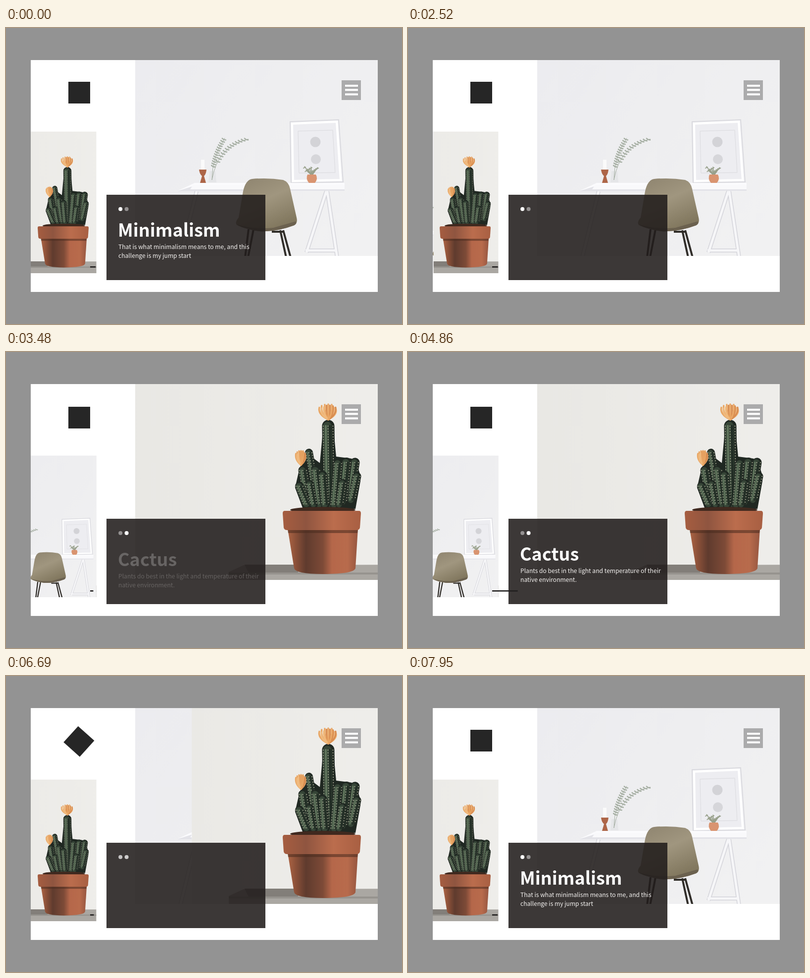
Animation of 800x600 px, one loop 8370 ms. Source, as an HTML page:

```html
<!DOCTYPE html>
<html lang="en">
<head>
<meta charset="utf-8">
<title>Minimalism slider</title>
<style>
html, body { margin: 0; width: 100%; height: 100%; overflow: hidden; background: #939393; }
svg { overflow: hidden; }
#stage { display: block; width: 800px; height: 600px; }
text { font-family: "Noto Sans CJK JP", "Noto Sans CJK SC", "Noto Sans CJK", "Noto Sans", sans-serif; fill: #fff; }
.title { font-weight: 700; font-size: 36px; }
.body { font-size: 12.1px; fill: #f6f4f2; }
</style>
</head>
<body>
<svg id="stage" viewBox="0 0 800 600">
  <defs>
    <linearGradient id="wall" x2="1" y2=".6">
      <stop stop-color="#ebebef"/><stop offset=".55" stop-color="#eeeef0"/><stop offset="1" stop-color="#f1f1f2"/>
    </linearGradient>
    <linearGradient id="shell" x2=".5" y2="1">
      <stop stop-color="#8d836e"/><stop offset=".5" stop-color="#a0967f"/><stop offset="1" stop-color="#82785f"/>
    </linearGradient>
    <linearGradient id="plaster" x2="1">
      <stop stop-color="#e8e7e3"/><stop offset="1" stop-color="#efeeeb"/>
    </linearGradient>
    <linearGradient id="clay" x2="1">
      <stop stop-color="#ad6444"/><stop offset=".12" stop-color="#8a5038"/><stop offset=".26" stop-color="#5f3b2e"/>
      <stop offset=".5" stop-color="#7d4a37"/><stop offset=".63" stop-color="#b5674a"/>
      <stop offset=".85" stop-color="#b86b4c"/><stop offset="1" stop-color="#965640"/>
    </linearGradient>
    <linearGradient id="rim" x2="1">
      <stop stop-color="#a65d40"/><stop offset=".3" stop-color="#8f5540"/><stop offset=".65" stop-color="#bb6d4d"/><stop offset="1" stop-color="#a85f42"/>
    </linearGradient>

    <g id="desk">
      <path d="M200 -40H800V520H200Z" fill="url(#wall)"/>
      <path d="M574 190L672 186L681 312L576 314Z" fill="#f4f4f6" stroke="#d9d9de" stroke-width="2"/>
      <path d="M578 194L668 190L676 308L580 310Z" fill="#ededf1" stroke="#fff" stroke-width="4"/>
      <path d="M590 209L660 207L665 293L592 294Z" fill="none" stroke="#dadade"/>
      <circle cx="625" cy="231" r="10.5" fill="#d3d3d7"/>
      <circle cx="626" cy="266" r="10" fill="#d6d6da"/>
      <path d="M345 331L381 314H684V330Z" fill="#fbfbfd"/>
      <path d="M345 331L380 320H684V330Z" fill="#e3e3e8"/>
      <path d="M378 318H684V327H372Z" fill="#f9f9fb"/>
      <g fill="none" stroke="#d4d4da" stroke-width="8">
        <path d="M385 331L352 465M647 331L607 455M649 331L669 465M605 451H666"/>
        <path d="M385 331L352 465M647 331L607 455M649 331L669 465M605 451H666" stroke="#f6f6f8" stroke-width="5"/>
      </g>
      <path d="M394 267H401V288H394Z" fill="#fafafa"/>
      <path d="M390 287H405Q404 297 400 300L404 314H392L396 300Q391 296 390 287Z" fill="#ad6547"/>
      <path d="M411 290H423L425 313H409Z" fill="#e2e4e6" opacity=".8"/>
      <g id="sprig" fill="none" stroke="#a5aea2"></g>
      <g id="herbs" fill="none" stroke="#98a08b" stroke-linecap="round"></g>
      <path d="M609 297H626Q631 306 624 314H612Q605 306 609 297Z" fill="#d99470"/>
      <path d="M490 408L483 465M500 408L489 465M554 410L566 465M560 410L575 465M537 413H562" fill="none" stroke="#302d29" stroke-width="4"/>
      <path d="M497 306Q530 303 560 308Q571 312 574 326L587 384Q590 396 582 400Q545 414 512 412Q480 407 466 399Q462 394 470 384L479 331Q484 308 497 306Z" fill="url(#shell)"/>
      <path d="M466 398Q500 409 540 405L585 392Q588 397 582 400Q545 414 512 412Q480 407 466 398Z" fill="#6b614f"/>
    </g>

    <g id="cactus">
      <path d="M200 -40H800V520H200Z" fill="url(#plaster)"/>
      <path d="M450 446L480 432L800 431V520H450Z" fill="#aaa7a2"/>
      <path d="M450 447H800V451H450Z" fill="#96938e"/>
      <path d="M482 431H590V447H490Z" fill="#827e79"/>
      <path d="M641 150Q651 130 661 150L667 212L698 216Q718 240 716 262L706 318H600L584 275L592 240L606 204L634 225Z" fill="#202822"/>
      <g id="stems" fill="none" stroke-linecap="round"></g>
      <g id="petals" fill="none" stroke-linecap="round"></g>
      <ellipse cx="640" cy="320" rx="66" ry="6" fill="#40291f"/>
      <path d="M569 358H711L706 438Q704 450 640 450Q584 450 582 438Z" fill="url(#clay)"/>
      <path d="M569 360H711L710 367H570Z" fill="#4a2b1e" opacity=".55"/>
      <path d="M563 322H713Q717 322 717 327L715 356Q714 361 708 361H568Q562 361 561 356L559 327Q559 322 563 322Z" fill="url(#rim)"/>
    </g>
  </defs>

  <path d="M0 0H800V600H0Z" fill="#939393"/>
  <path d="M50 65H751V535H50Z" fill="#fff"/>
  <svg x="261" y="65" width="490" height="397"><use class="hero" x="-261" y="-65"/></svg>
  <svg id="heroWipe" x="261" y="65" width="490" height="397"><use class="hero" x="-261" y="-65"/></svg>
  <svg x="50" y="210" width="132.5" height="287"><use class="thumb"/></svg>
  <svg id="thumbWipe" x="50" y="210" width="132.5" height="287"><use class="thumb"/></svg>

  <rect id="mark" x="126" y="109" width="44" height="44" fill="#262626"/>
  <path d="M678 106H717V146H678Z" fill="#ababac"/>
  <path d="M685 117H711M685 125.5H711M685 134.5H711" stroke="#fff" stroke-width="4"/>

  <path d="M203 338H524V511H203Z" fill="#221d1c" opacity=".88"/>
  <circle class="dot" cx="231.2" cy="367" r="4" fill="#fff"/>
  <circle class="dot" cx="243.6" cy="367" r="4" fill="#fff"/>
  <g class="copy">
    <text class="title" x="226" y="423">Minimalism</text>
    <text class="body" x="227" y="448">That is what minimalism means to me, and this</text>
    <text class="body" x="227" y="466">challenge is my jump start</text>
  </g>
  <g class="copy">
    <text class="title" x="226" y="423">Cactus</text>
    <text class="body" x="227" y="448">Plants do best in the light and temperature of their</text>
    <text class="body" x="227" y="466">native environment.</text>
  </g>
  <rect id="line" x="170" y="483" height="2.6" fill="#211f1f"/>
</svg>

<script>
const LOOP = 8370, MOTION = 7950, HALF = MOTION / 2;
const $ = id => document.getElementById(id);
const all = cls => [...document.getElementsByClassName(cls)];

function add(id, d, attrs = {}) {
  const path = document.createElementNS("http://www.w3.org/2000/svg", "path");
  path.setAttribute("d", d);
  for (const key in attrs) path.setAttribute(key, attrs[key]);
  $(id).append(path);
}

// Cactus columns: top x, top y, bottom x, bottom y, width
const columns = [
  [612, 204, 624, 270, 16], [651, 150, 653, 306, 25], [600, 240, 610, 300, 19],
  [705, 224, 694, 296, 19], [688, 224, 680, 304, 20], [626, 240, 634, 308, 20],
  [671, 226, 664, 309, 19], [593, 272, 608, 308, 18], [709, 252, 698, 300, 17],
  [640, 250, 645, 309, 18], [614, 268, 622, 309, 16], [680, 266, 674, 309, 17]
];
for (const [x1, y1, x2, y2, w] of columns) {
  const ridge = k => `M${x1 + k * w} ${y1}L${x2 + k * w} ${y2}`;
  add("stems", ridge(0), { stroke: "#202822", "stroke-width": w });
  add("stems", ridge(-.08), { stroke: "#364537", "stroke-width": w * .7 });
  add("stems", ridge(-.2), { stroke: "#60745c", "stroke-width": w * .17 });
  add("stems", ridge(.14), { stroke: "#222d25", "stroke-width": w * .18 });
  for (const k of [-.4, -.02, .38])
    add("stems", ridge(k), { stroke: "#a9ad95", "stroke-width": 1.8, "stroke-dasharray": "0.5 5" });
}

function flower(x, y, size, spread) {
  for (let i = 0; i < 13; i++) {
    const a = (i * 5 % 13 - 6) * .17, r = size * (1 - .07 * (i % 3)), dx = Math.sin(a) * r * spread;
    add("petals", `M${x} ${y}Q${x + dx * 1.2} ${y - r * .35} ${x + dx} ${y - Math.cos(a * .65) * r}`,
      { stroke: ["#e9a765", "#d98d51", "#f0ba7e"][i % 3], "stroke-width": size * .11 });
  }
}
flower(651, 137, 31, .68);
flower(596, 229, 29, .42);

// Eucalyptus sprig: leaf pairs along two curved stems
for (const [cx, cy, ex, ey] of [[416, 262, 442, 223], [428, 238, 490, 225]]) {
  add("sprig", `M416 308Q${cx} ${cy} ${ex} ${ey}`);
  for (let s = .3; s < 1.01; s += .055) {
    const mix = (a, b, c) => (1 - s) ** 2 * a + 2 * s * (1 - s) * b + s * s * c;
    const x = mix(416, cx, ex), y = mix(308, cy, ey);
    add("sprig", `M${x - 4} ${y - 3}L${x} ${y}L${x + 5} ${y + 1}`, { "stroke-width": 2.4 });
  }
}
for (let i = 0; i < 9; i++) {
  const x = 603 + i * 3.3, y = 281 + i * 7 % 9;
  add("herbs", `M618 299L${x} ${y}m-2 3l4 -2`, { "stroke-width": 1.8 });
}

const clamp = x => Math.max(0, Math.min(1, x));
const ramp = (t, start, length) => clamp((t - start) / length);
const cubic = x => x < .5 ? 4 * x ** 3 : 1 - 4 * (1 - x) ** 3;
const quad = x => x < .5 ? 2 * x * x : 1 - 2 * (1 - x) ** 2;

// Right end of the progress line: time, x
const lineKeys = [[0, 181], [290, 188], [840, 218], [1125, 241], [1680, 281], [1755, 281], [1890, 268],
  [1995, 241], [2250, 200], [2500, 182], [2715, 177.5], [3000, 175], [3675, 177], [HALF, 181]];
function lineEnd(u) {
  const i = Math.max(1, lineKeys.findIndex(k => u <= k[0]));
  const [a, x] = lineKeys[i - 1], [b, y] = lineKeys[i];
  return x + (y - x) * (u - a) / (b - a);
}

const thumbPlace = {
  desk: "translate(-270 19) scale(.58)",
  cactus: "translate(-350.5 -18) scale(.652)"
};
function setPhoto(use, name) {
  use.setAttribute("href", "#" + name);
  if (use.classList.contains("thumb")) use.setAttribute("transform", thumbPlace[name]);
}

function setCopy(el, enter, leave) {
  const y = 18 * (1 - enter) ** 2 + 18 * quad(ramp(leave, 0, 760));
  el.setAttribute("transform", `translate(0 ${y})`);
  el.setAttribute("opacity", enter * (1 - ramp(leave, 270, 400)));
}

const heroes = all("hero"), thumbs = all("thumb"), dots = all("dot"), copies = all("copy");
let shown = -1;

function draw(now) {
  const t = Math.min(now % LOOP, MOTION);
  const back = t > 5000 ? 1 : 0;
  const s = t - back * 3700;

  if (back !== shown) {
    const names = back ? ["cactus", "desk"] : ["desk", "cactus"];
    heroes.forEach((use, i) => setPhoto(use, names[i % 2]));
    thumbs.forEach((use, i) => setPhoto(use, names[1 - i]));
    shown = back;
  }
  const turn = cubic(ramp(s, 2704, 740));
  $("heroWipe").setAttribute("width", 490 * turn);
  $("thumbWipe").setAttribute("width", 132.5 * cubic(ramp(s, 2432, 600)));
  $("mark").setAttribute("transform", `rotate(${180 * (turn + back)} 148 132)`);

  const fade = ramp(s, 2700, 630);
  dots.forEach((dot, i) => dot.setAttribute("opacity", .45 + .55 * (i === back ? 1 - fade : fade)));

  const enter = ramp(s, 3370, 480);
  setCopy(copies[0], back ? enter : 1, back ? 0 : t - 1740);
  setCopy(copies[1], back ? 1 : enter, t - 5715);
  $("line").setAttribute("width", lineEnd(t === MOTION ? HALF : t % HALF) - 170);
}

function tick() {
  draw(performance.now());
  requestAnimationFrame(tick);
}
tick();
</script>
</body>
</html>
```
